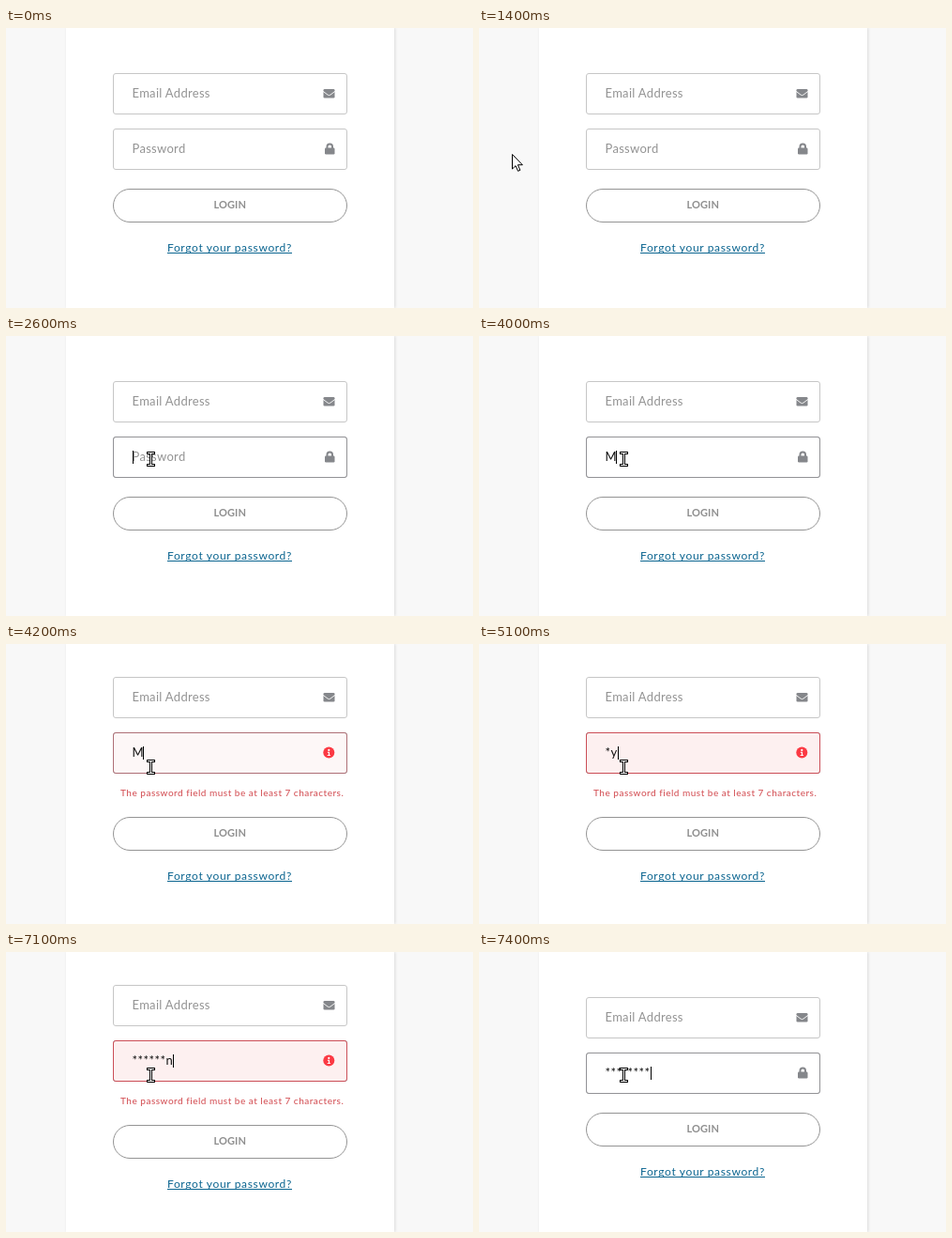
Recreate the animation shown at these times as an HTML page. Size 498 px wide and 298 px high, loop 8 s.

```html
<!DOCTYPE html>
<html lang="en">
<head>
<meta charset="utf-8">
<title>Login form</title>
<style>
  html, body { margin: 0; width: 100%; height: 100%; overflow: hidden; background: #f8f8f8; }
  .stage { position: relative; width: 100%; height: 100%; overflow: hidden; }
  .card { position: absolute; left: 64px; top: 0; width: 350px; height: 100%; background: #fff; box-shadow: 1px 0 3px rgba(0, 0, 0, .12); }
  svg { position: absolute; left: 0; top: 0; display: block; }
  text { font: 13px Lato, "Open Sans", sans-serif; letter-spacing: .3px; white-space: pre; }
  .hint { fill: #939393; }
  .box { fill: none; stroke: #c6c6c6; }
  .focus { stroke: #929296; }
  .bad { fill: #fdf0f0; stroke: #cb4e57; }
  .icon { fill: #85878b; }
  .button { fill: none; stroke: #949494; }
  .login { font-size: 11px; font-weight: 700; letter-spacing: .1px; fill: #8f8f8f; text-anchor: middle; }
  .link { font-size: 12px; letter-spacing: .65px; fill: #0b6590; }
  .message { font-size: 10px; font-weight: 500; letter-spacing: .5px; fill: #d5555a; }
</style>
</head>
<body>
<div class="stage">
<div class="card"></div>
<svg width="498" height="298" viewBox="0 0 498 298">
  <g id="fields">
    <rect class="box" x="114.5" y="48.5" width="249" height="43" rx="2.5"/>
    <text class="hint" x="134.5" y="74">Email Address</text>
    <rect class="icon" x="338.5" y="65" width="12" height="9.5" rx="1.3"/>
    <path d="M338 67.3l5.2 3.9q1.3 .9 2.6 0l5.2-3.9" fill="none" stroke="#fff" stroke-width=".9"/>

    <rect class="box" x="114.5" y="107.5" width="249" height="43" rx="2.5"/>
    <rect id="focus" class="box focus" x="114.5" y="107.5" width="249" height="43" rx="2.5"/>
    <rect id="bad" class="bad" x="114.5" y="107.5" width="249" height="43" rx="2.5"/>
    <g id="lock">
      <rect class="icon" x="340" y="127.5" width="10.5" height="7" rx="1.2"/>
      <path d="M342.5 128v-1.7a2.75 2.75 0 0 1 5.5 0v1.7" fill="none" stroke="#85878b" stroke-width="2"/>
    </g>
    <g id="info">
      <circle cx="344.3" cy="128.6" r="6" fill="#fb3943"/>
      <circle cx="344.3" cy="125.9" r="1.1" fill="#fff"/>
      <path d="M342.9 128.4h1.6v3M342.7 131.5h3.2" fill="none" stroke="#fff" stroke-width="1.2"/>
    </g>
    <text id="hint" class="hint" x="134.5" y="133">Password</text>
    <text id="typed" y="133" fill="#111"></text>
    <rect id="caret" y="122" width="1" height="14" fill="#000"/>
  </g>

  <text id="message" class="message" x="122" y="162">The password field must be at least 7 characters.</text>

  <g id="actions">
    <rect class="button" x="114.5" y="171.5" width="249" height="35" rx="17.5"/>
    <text class="login" x="238.7" y="192">LOGIN</text>
    <text class="link" x="172" y="238">Forgot your password?</text>
    <path d="M172 239.5h133" stroke="#0b6590"/>
  </g>

  <g id="pointer">
    <path id="arrow" d="M.5 .5v15.5l3.6-3.4 2.5 5.7 2.3-1-2.5-5.6h5z" fill="#fff" stroke="#000"/>
    <g id="beam" fill="none" stroke-linecap="square">
      <path d="M-3.5-6.5h6M-.5-6.5v13M-3.5 6.5h6" stroke="#000" stroke-width="3"/>
      <path d="M-3.5-6.5h6M-.5-6.5v13M-3.5 6.5h6" stroke="#fff"/>
    </g>
  </g>
</svg>
</div>
<script>
  const LOOP = 8000, TICK = 100, LEFT = 135, STAR = 6;
  const el = Object.fromEntries([...document.querySelectorAll('[id]')].map(e => [e.id, e]));

  // start time, masked characters, visible character, its advance
  const typing = [
    [0, 0, '', 0], [4000, 0, 'M', 11], [4300, 1, '', 0],
    [5100, 1, 'y', 7], [5500, 2, '', 0],
    [5800, 2, 'd', 8], [6100, 3, '', 0],
    [6400, 3, 's', 6], [6700, 4, 'e', 7], [6800, 5, 'a', 7],
    [7000, 6, '', 0], [7100, 6, 'n', 7], [7200, 7, 'd', 7], [7400, 8, '', 0]
  ];
  const caretLevels = [[0, 0], [2600, 1], [3500, .5], [3600, 0], [4000, 1], [4700, 0], [5100, 1]];
  const focusLevels = [[0, 0], [2500, .5], [2600, 1]];
  const badLevels = [[0, 0], [4200, .5], [4300, 1], [7300, .5], [7400, 0]];

  const at = (steps, t) => steps.findLast(step => step[0] <= t).slice(1);
  const show = (e, level) => e.setAttribute('opacity', Number(level));
  const move = (e, x, y) => e.setAttribute('transform', `translate(${x} ${y})`);

  function drawPointer(t) {
    const p = Math.min(1, Math.max(0, (t - 1400) / 500));
    const x = t >= 2400 ? 155 : Math.round(35 + 117 * (1 - (1 - p) ** 1.7));
    const overField = x > 114;
    show(el.pointer, t >= 1400);
    show(el.arrow, !overField);
    show(el.beam, overField);
    move(el.pointer, x, Math.round(134 - 3 * p));
  }

  function drawField(t) {
    const [stars, letter, advance] = at(typing, t);
    const value = '*'.repeat(stars) + letter;
    if (el.typed.textContent !== value) {
      el.typed.textContent = value;
      el.typed.setAttribute('x', [...value].map((_, i) => LEFT - .5 + STAR * i).join(' '));
    }
    el.caret.setAttribute('x', LEFT + STAR * stars + advance);
    show(el.caret, at(caretLevels, t)[0]);
    show(el.hint, !value);
    show(el.focus, at(focusLevels, t)[0]);
  }

  function drawError(t) {
    const bad = at(badLevels, t)[0];
    const open = t >= 4200 && t < 7300;
    const shift = open ? 13 : 0;
    move(el.fields, 0, -shift);
    move(el.actions, 0, shift);
    show(el.bad, bad);
    show(el.message, open);
    show(el.info, open);
    show(el.lock, !open);
  }

  const start = performance.now();
  function frame() {
    const t = Math.floor(((performance.now() - start) % LOOP) / TICK) * TICK;
    drawPointer(t);
    drawField(t);
    drawError(t);
    requestAnimationFrame(frame);
  }
  frame();
</script>
</body>
</html>
```
